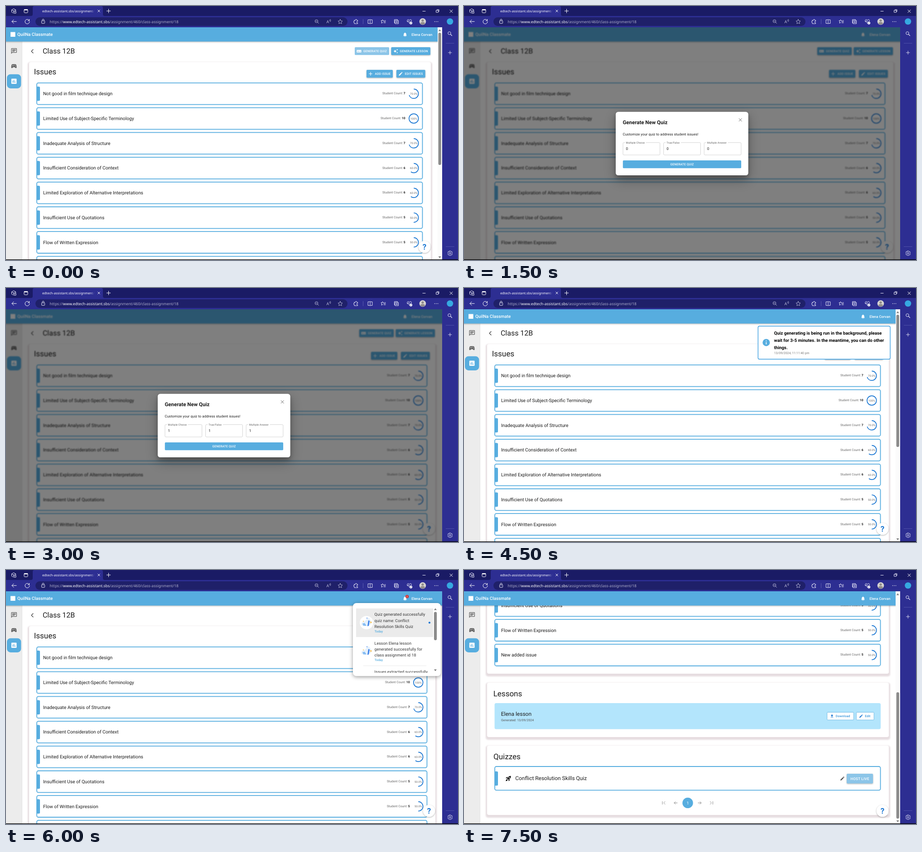
Recreate the animation shown at these times as an HTML page. Size 998x561 px, loop 8000 ms.

```html
<!DOCTYPE html>
<html lang="en">
<head>
<meta charset="utf-8">
<title>Class issues</title>
<style>
  html, body { margin: 0; width: 100%; height: 100%; overflow: hidden; background: #fff; }
  svg { display: block; width: 998px; height: 561px; }
  text { font-family: Roboto, sans-serif; text-rendering: geometricPrecision; white-space: pre; }
  .ui { font-family: "Noto Sans", sans-serif; }
  .line { fill: none; stroke-linecap: round; stroke-linejoin: round; }
  .lift { filter: drop-shadow(0 1px 1.5px rgba(0,0,0,.3)); }
  .blurred { filter: blur(1.3px); }
  .dialog { filter: drop-shadow(0 5px 5px rgba(0,0,0,.25)) drop-shadow(0 9px 14px rgba(0,0,0,.28)); }
  .popover { filter: drop-shadow(0 2px 4px rgba(0,0,0,.4)); }
  .card-shadow { filter: blur(1.5px); }
</style>
</head>
<body>
<svg id="stage" viewBox="0 0 998 561"></svg>
<script>
const BLUE = '#57addf', PALE = '#8cc5e8', LINK = '#1976d2', INK = '#1b1b1b', GREY = '#666';
const NAVY = '#1a1b65', INDIGO = '#2d2e92';
const USER = 'Elena Corvan', BRAND = 'QuilNa Classmate', LESSON = 'Elena lesson';
const QUIZ = 'Conflict Resolution Skills Quiz';
const ISSUES = [
  ['Not good in film technique design', 7],
  ['Limited Use of Subject-Specific Terminology', 10],
  ['Inadequate Analysis of Structure', 7],
  ['Insufficient Consideration of Context', 6],
  ['Limited Exploration of Alternative Interpretations', 6],
  ['Insufficient Use of Quotations', 5],
  ['Flow of Written Expression', 5],
  ['New added issue', 5],
];

// Filled glyphs on a 24-unit grid
const GLYPHS = {
  chat: 'M4 2H20Q22 2 22 4V16Q22 18 20 18H6L2 22V4Q2 2 4 2ZM4 4V17L5 16H20V4ZM6 6H18V8H6ZM6 9H18V11H6ZM6 12H14V14H6Z',
  pad: 'M7.5 5H16.5Q20 5 20.5 8.5L21.6 16Q21.5 19 19 19Q18 19 15 16H9Q6 19 5 19Q2.5 19 2.4 16L3.5 8.5Q4 5 7.5 5ZM8 8V10H6V11H8V13H9V11H11V10H9V8ZM14 8V10H16V8ZM16 11V13H18V11Z',
  chart: 'M5 3H19Q21 3 21 5V19Q21 21 19 21H5Q3 21 3 19V5Q3 3 5 3ZM7 10V17H9V10ZM11 7V17H13V7ZM15 13V17H17V13Z',
  bell: 'M10 20H14Q14 22 12 22T10 20ZM18 16L20 18V19H4V18L6 16V11Q6 6 10.5 4.7V4Q10.5 2.5 12 2.5T13.5 4V4.7Q18 6 18 11Z',
  pencil: 'M3 17.2V21H6.8L17.8 9.9L14.1 6.2ZM20.7 7Q21.3 6.3 20.7 5.6L18.4 3.3Q17.7 2.7 17 3.3L15.1 5.1L18.9 8.9Z',
  sparkle: 'M9 4L11.5 9.5L17 12L11.5 14.5L9 20L6.5 14.5L1 12L6.5 9.5ZM19 1L20.2 3.8L23 5L20.2 6.2L19 9L17.8 6.2L15 5L17.8 3.8ZM19 15L20.2 17.8L23 19L20.2 20.2L19 23L17.8 20.2L15 19L17.8 17.8Z',
  quiz: 'M3 6H21Q23 6 23 8V16Q23 18 21 18H3Q1 18 1 16V8Q1 6 3 6ZM5 10V14H10V10ZM14 10V14H16V10ZM18 10V14H20V10Z',
  download: 'M5 20H19V18H5ZM19 9H15V3H9V9H5L12 16Z',
  rocket: 'M21.3 2.7Q22.5 8 17 13.3Q15 15.3 11.2 17L7 12.8Q8.6 9 10.7 7Q16 1.5 21.3 2.7ZM15 7A2 2 0 1 0 15.1 7ZM9.2 6.3L5.6 12.2L2 10.7L6 6.6ZM17.6 14.8L11.8 18.4L13.3 22L17.4 18ZM6 15Q9 15 9 18Q9 21 2 22Q3 15 6 15Z',
};

const rect = (x, y, w, h, fill, r = 0, more = '') =>
  `<rect x="${x}" y="${y}" width="${w}" height="${h}" rx="${r}" fill="${fill}" ${more}/>`;
const circle = (x, y, r, fill, more = '') => `<circle cx="${x}" cy="${y}" r="${r}" fill="${fill}" ${more}/>`;
const border = (color, width) => `stroke="${color}" stroke-width="${width}"`;
const text = (x, y, str, size, { fill = INK, weight = 400, anchor = 'start', gap = 0, cls = '' } = {}) =>
  `<text x="${x}" y="${y}" font-size="${size}" fill="${fill}" font-weight="${weight}" text-anchor="${anchor}" letter-spacing="${gap}" class="${cls}">${str}</text>`;
const glyph = (name, x, y, size, fill) =>
  `<path transform="translate(${x - size / 2} ${y - size / 2}) scale(${size / 24})" fill="${fill}" fill-rule="evenodd" d="${GLYPHS[name]}"/>`;
// Stroked icon drawn around its own centre
const line = (x, y, d, color = '#e6e6f7', width = 1) =>
  `<path class="line" transform="translate(${x} ${y})" d="${d}" ${border(color, width)}/>`;
const plus = (x, y, r, color, width) => line(x, y, `M${-r} 0H${r}M0 ${-r}V${r}`, color, width);
const cross = (x, y, r, color, width) => line(x, y, `M${-r} ${-r}L${r} ${r}M${r} ${-r}L${-r} ${r}`, color, width);
const triangle = (x, y, dir) => `<path d="M${x - 3} ${y + 2 * dir}h6l-3 ${-4 * dir}z" fill="#7d7d7d"/>`;
const label = (x, y, str, fill = '#fff', size = 6.7, anchor = 'start') =>
  text(x, y, str, size, { fill, weight: 500, gap: size * .028, anchor });

function browser() {
  const ring = (x, y, r) => circle(x, y, r, 'none', border('#e6e6f7', 1));
  return rect(0, 0, 998, 47, INDIGO) + rect(0, 0, 998, 22, NAVY) + rect(963, 47, 35, 514, INDIGO)
    + `<path d="M55 22Q59 22 59 18V4Q59 0 63 0H210Q214 0 214 4V18Q214 22 218 22Z" fill="${INDIGO}"/>`
    + line(17, 11, 'M-4.5 -2.5L0 -5L4.5 -2.5V1M-4.5 -2.5V2.5L-1 4.5M-4.5 -2.5L0 0L4.5 -2.5M0 0V2M1 1.5H5V5H1Z')
    + rect(40, 7.5, 8, 7.5, 'none', 1.5, border('#fff', 1)) + rect(40, 7, 8, 2.5, '#fff', 1)
    + `<g clip-path="url(#tabClip)">${text(80, 13.6, 'edtech-assistant.sbs/assignment/', 7.3, { fill: '#fff', cls: 'ui' })}</g>`
    + rect(186, 4, 10, 14, 'url(#tabFade)')
    + cross(205, 11, 2.3, '#fff') + plus(226.5, 11, 4.2, '#fff')
    + line(923, 11.5, 'M-3 0H3') + line(953, 11, 'M-3 -1.5H1.5V3H-3ZM-1.5 -3H3V1.5') + cross(983, 11.5, 3, '#fff')
    + rect(65, 25, 689, 19, '#1f2069', 9.5)
    + line(18, 34.3, 'M5 0H-5M-1 -4L-5 0L-1 4', '#fff') + line(47, 34.5, 'M4 -3A5 5 0 1 0 5 0M4.5 -5V-2H1.5', '#fff')
    + rect(78.5, 32.5, 7, 6, 'none', 1, border('#e6e6f7', 1)) + line(82, 32, 'M-2 0V-1Q-2 -3 0 -3T2 -1V0M0 3.2V3.6')
    + `<text class="ui" x="96.5" y="37.7" font-size="8.5" fill="#aeaecb">https://<tspan fill="#fff">www.edtech-assistant.sbs</tspan>/assignment/460/class-assignment/18</text>`
    + circle(685.5, 33.5, 3.3, 'none', border('#b9b9d8', .9)) + line(686, 34, 'M2 2L4.5 4.5M-2 -.5H1', '#b9b9d8', .9)
    + text(707.5, 38, 'A', 9, { fill: '#b9b9d8', cls: 'ui' }) + line(714.5, 32, 'M0 -1.5Q1 0 0 1.5M1.7 -2.7Q3.5 0 1.7 2.7', '#b9b9d8', .8)
    + line(738, 34.5, 'M0 -5L1.5 -1.7L5 -1.3L2.4 1.1L3.1 4.6L0 2.9L-3.1 4.6L-2.4 1.1L-5 -1.3L-1.5 -1.7Z', '#b9b9d8', .9)
    + line(772.5, 34.5, 'M-3.5 -3H-1Q-1 -5 .5 -5T2 -3H4V-.5Q1.5 -.5 1.5 1T4 2.5V4.5H-3.5V2Q-5 2 -5 .5T-3.5 -1Z')
    + line(788.5, 34.5, 'M0 -5V5', '#6566b4', .8)
    + line(804, 34.5, 'M-1.3 -4H-4.8V4H-1.3M1.3 -4H4.8V4H1.3M0 -5V5')
    + line(833, 34.5, 'M1.5 -2L-.5 -2L-1.5 -4.5L-2.7 -2H-5L-3.3 0L-4 3.5L-1.3 2M1 0H5M1 2.5H5M3 -2.3H5')
    + line(862, 34.5, 'M-3 3H-4.5V-4.5H2.5V-3M-2.5 -2.5H4.5V4.5H-2.5ZM1 -1V3M-1 1H3')
    + line(890.5, 34, 'M0 4L-4 0Q-6 -3 -3.3 -4Q-1 -4.5 0 -2.3Q1 -4.5 3.3 -4Q6 -3 4 0M-5 0H-2L-1 -1.5L.5 1') + circle(894, 37.5, 3.1, '#fff') + line(894, 37.5, 'M-1.3 0L-.3 1L1.4 -1', INDIGO, .8)
    + circle(920, 34.3, 7.3, '#d5d3d2') + circle(920, 32, 2.6, '#8e8a88') + '<path d="M915 39Q915 35.5 920 35.5T925 39Q920 43 915 39Z" fill="#8e8a88"/>'
    + [-3.5, 0, 3.5].map(d => circle(950 + d, 34.5, .8, '#fff')).join('')
    + circle(980.3, 34.2, 7, '#36a9e1')
    + ring(979, 60, 3.2) + line(980, 61, 'M1.5 1.5L4.5 4.5', '#e6e6f7', 1.3)
    + line(980.3, 82.3, 'M-9 0H9', '#5a5bb0', .8) + plus(980.3, 103, 3.7, '#e6e6f7', .9) + line(980.3, 531.5, 'M-9 0H9', '#5a5bb0', .8)
    + ring(980.5, 546, 1.6) + line(980.5, 546, 'M-1.2 -5H1.2L1.8 -3.3L3.6 -4L5 -1.8L3.8 0L5 1.8L3.6 4L1.8 3.3L1.2 5H-1.2L-1.8 3.3L-3.6 4L-5 1.8L-3.8 0L-5 -1.8L-3.6 -4L-1.8 -3.3Z', '#e6e6f7', .9)
    + rect(0, 559.7, 998, 1.3, '#000');
}

const card = (y, h, dx) => rect(48, y, 893 + dx, h + 6, '#e6dde0', 5, 'class="card-shadow"') + rect(51, y, 887 + dx, h, '#fff', 4);

const outlined = (y, h, dx, tabY, tabH) => rect(68, y, 851.5 + dx, h, '#fff', 3.5, border(BLUE, 1.8))
  + `<path d="M67.5 ${tabY}h5q2.5 0 2.5 2.5v${tabH - 5}q0 2.5 -2.5 2.5h-5z" fill="${BLUE}"/>`;

function issueRow([title, count], i, dx) {
  const mid = 193.8 + i * 54.72, x = 900.3 + dx, length = 2 * Math.PI * 10.4;
  return outlined(mid - 23.9, 47.8, dx, mid - 15.8, 31.6)
    + text(82, mid + 3.4, title, 10.28)
    + `<text x="${881.7 + dx}" y="${mid + 1.6}" font-size="6.85" fill="${GREY}" text-anchor="end">Student Count: <tspan font-weight="700" fill="${INK}">${count}</tspan></text>`
    + circle(x, mid, 10.4, 'none', `${border(LINK, 1.7)} stroke-dasharray="${length * count / 10} ${length}" transform="rotate(-90 ${x} ${mid})"`)
    + text(x, mid + 2.2, count === 10 ? '100%' : `${count * 10}.0%`, 6, { fill: GREY, anchor: 'middle', gap: .12 });
}

function button(x, y, w, str, labelX, icon, fill = BLUE) {
  return rect(x, y, w, 17.3, fill, 1.8, fill === BLUE ? 'class="lift"' : '') + icon + label(labelX, y + 11, str);
}

function content(dx, active) {
  const arrow = 'M-3.5 0H3.5M.5 -3L3.5 0L.5 3', last = 'M-3 -3L0 0L-3 3M3 -3V3';
  const pager = (x, d, flip) => `<g transform="translate(${x} 903.4) scale(${flip} 1)">${line(0, 0, d, '#8f8f8f', 1)}</g>`;
  const small = (x, w) => rect(x, 703.2, w, 17, '#fff', 1.5, border(BLUE, .8));
  return line(58, 100, 'M2 -4L-2 0L2 4', '#333', 1.1) + text(81, 105, 'Class 12B', 15.95)
    + button(770 + dx, 91, 76, 'GENERATE QUIZ', 789 + dx, glyph('quiz', 779.5 + dx, 99.8, 11, '#fff'), active ? PALE : BLUE)
    + button(850.5 + dx, 91, 86.5, 'GENERATE LESSON', 869.5 + dx, glyph('sparkle', 860.5 + dx, 99.8, 11, '#fff'))
    + card(124, 494, dx) + text(61.7, 151.2, 'Issues', 17)
    + button(796 + dx, 141, 58, 'ADD ISSUE', 814.5 + dx, plus(805 + dx, 149.7, 3.5, '#fff', 1.1))
    + button(862 + dx, 141, 63.7, 'EDIT ISSUES', 880.8 + dx, glyph('pencil', 871.5 + dx, 149.7, 10.5, '#fff'))
    + ISSUES.map((issue, i) => issueRow(issue, i, dx)).join('')
    + card(638, 120, dx) + text(64.7, 668.2, 'Lessons', 17)
    + rect(67.5, 683, 852.5, 57.5, '#b3e5fc', 3.5)
    + text(81.7, 710.6, LESSON, 12) + text(82, 722.7, 'Generated: 13/09/2024', 6.95, { fill: '#555' })
    + small(801.7, 58.8) + glyph('download', 812.5, 711.7, 9.5, LINK) + label(820.8, 714, 'Download', '#2f91d8', 6.8)
    + small(866.2, 39) + glyph('pencil', 876.7, 711.7, 9.5, LINK) + label(885.2, 714, 'Edit', '#2f91d8', 6.8)
    + card(777, 153, dx) + text(65, 807.2, 'Quizzes', 17)
    + outlined(823, 52.3, dx, 833.8, 31.5)
    + glyph('rocket', 98, 849.4, 14, '#111') + text(113.3, 853, QUIZ, 11.95)
    + glyph('pencil', 835.5, 849.5, 11.5, '#555')
    + rect(845, 839, 58, 21.5, PALE, 2, 'class="lift"') + label(874, 852.5, 'HOST LIVE', '#fff', 8.15, 'middle')
    + pager(441, last, -1) + pager(467.5, arrow, -1) + pager(520.3, arrow, 1) + pager(546.5, last, 1)
    + circle(494, 903.4, 11.7, BLUE) + text(494, 906.6, '1', 9, { fill: '#fff', anchor: 'middle' });
}

function scrollbar(top, height) {
  return rect(953, 47, 10, 513, '#fbfbfb') + rect(954.6, top, 6.2, height, '#8b8b8b', 3.1)
    + triangle(957.7, 53.5, 1) + triangle(957.7, 555, -1);
}

function page({ dx = 0, scroll = 0, active = false, thumb }) {
  return rect(-5, 40, 968, 530, '#fff')
    + `<g transform="translate(0 ${-scroll})">${content(dx, active)}</g>`
    + rect(-5, 70, 40, 495, '#ececec') + rect(35, 70, .7, 495, '#dcdcdc')
    + glyph('chat', 17.7, 99.5, 15, '#606060') + glyph('pad', 17.5, 132.8, 15, '#606060')
    + rect(2, 150.7, 31.3, 31.2, BLUE, 8) + glyph('chart', 17.6, 166.2, 15.5, '#fff')
    + rect(-5, 40, 973, 38.5, BLUE, 0, 'class="lift"')
    + rect(10, 57.5, 10.5, 10.5, '#fff')
    + text(25, 66.2, BRAND, 9.75, { fill: '#fff', weight: 500 })
    + glyph('bell', 881, 63, 11.5, '#fff')
    + text(941.3, 65.5, USER, 7.85, { fill: '#fff', weight: 500, anchor: 'end' })
    + circle(924 + dx, 532, 13.3, '#fff', 'class="lift"')
    + text(924 + dx, 538.3, '?', 17, { fill: LINK, weight: 700, anchor: 'middle' })
    + (thumb ? scrollbar(...thumb) : '');
}

function dialog(value) {
  const field = (x, name, gapWidth) => rect(x, 301.7, 81.7, 27.3, '#fff', 2, border('#c2c2c2', .7))
    + rect(x + 4.5, 300.5, gapWidth, 2.5, '#fff') + text(x + 6.6, 303.7, name, 5.95, { fill: GREY, gap: .03 })
    + text(x + 6.6, 318.4, value, 8.2);
  return `<g class="blurred">${page({ dx: 10 })}</g>` + rect(0, 47, 963, 513, '#000', 0, 'opacity=".5"')
    + rect(335, 233.8, 292.7, 140.2, '#fff', 5.5, 'class="dialog"')
    + text(350.5, 260.6, 'Generate New Quiz', 11.5, { weight: 700 }) + cross(610.2, 251.5, 3, '#555', .9)
    + text(350.6, 286.2, 'Customize your quiz to address student issues!', 7.8, { gap: .07 })
    + field(351, 'Multiple Choice', 46) + field(440.7, 'True/False', 34) + field(530.2, 'Multiple Answer', 48)
    + rect(350.8, 340.9, 261.3, 17.3, BLUE, 1.8) + label(481.5, 352, 'GENERATE QUIZ', '#fff', 6.7, 'middle');
}

function toast() {
  const lines = ['Quiz generating is being run in the background, please',
    'wait for 3-5 minutes. In the meantime, you can do other', 'things.'];
  return rect(649.3, 84.2, 291.7, 73, '#fff', 3, border('#3d9fe0', 1.4))
    + circle(667.3, 120.4, 8, BLUE) + rect(666.5, 119.5, 1.6, 5, '#fff') + circle(667.3, 116.8, 1, '#fff')
    + lines.map((s, i) => text(684.5, 103.4 + i * 15.6, s, 9.75, { fill: '#000', weight: 700 })).join('')
    + text(684.7, 146, '13/09/2024, 11:11:40 pm', 6.9, { fill: '#777' });
}

function notification(y, lines, unread) {
  return (unread ? rect(773, y - 31.5, 170, 63.3, '#ebebeb') + circle(935, y, 2.1, LINK) : '')
    + circle(796, y, 14.8, '#fff')
    + `<g transform="translate(796 ${y})"><path d="M-11 6Q-13 0 -7 -2T1 -10Q5 -13 8 -7Q13 -2 9 4Q4 8 -2 7Z" fill="#e6f1fc"/>`
    + '<path d="M-9 2L-4 1L0 7L-7 7Z" fill="#86bdf2"/><path d="M4 -5L7 -4L5 7L2 8Z" fill="#3d82e8"/>'
    + '<path d="M8 -3L12 -1L9 2Z" fill="#f5b942"/><circle cx="1" cy="-10" r="1" fill="#3d82e8"/><circle cx="-7" cy="-3" r="1" fill="#f5b942"/></g>'
    + lines.map((s, i) => text(813.6, y - 15 + i * 13.2, s, 8.85, { gap: .06, fill: '#333' })).join('')
    + text(813.8, y + 21.7, 'Today', 6.9, { fill: BLUE, weight: 500 });
}

function notifications() {
  return circle(885.6, 58.6, 3.6, '#d32f2f') + text(885.6, 60.7, '!', 6, { fill: '#fff', weight: 700, anchor: 'middle' })
    + rect(766, 73, 194, 161.2, '#fff', 7.5, 'class="popover"')
    + '<g clip-path="url(#listClip)">'
    + notification(116.3, ['Quiz generated successfully', 'quiz name: Conflict', 'Resolution Skills Quiz'], true)
    + notification(179.6, ['Lesson ' + LESSON, 'generated successfully for', 'class assignment id 18'])
    + line(789, 211.6, 'M0 0H139', '#e2e2e2', .7)
    + notification(243, ['Issues extracted successfully'])
    + '</g>'
    + triangle(948, 86.5, 1) + rect(945, 92.5, 6.2, 62.5, '#8b8b8b', 3.1) + triangle(948, 221.5, -1);
}

const TOP = [59, 292], BOTTOM = [270, 279];
const SCENES = [
  [0, page({ active: true, thumb: TOP })],
  [1500, dialog(0)],
  [3000, dialog(1)],
  [4500, page({ thumb: TOP }) + toast()],
  [6000, page({ dx: 10 }) + notifications()],
  [7500, page({ scroll: 389, thumb: BOTTOM })],
];
const LOOP = 8000;

const stage = document.getElementById('stage');
stage.innerHTML = `<defs>
  <clipPath id="pageClip"><rect y="47" width="963" height="513"/></clipPath>
  <clipPath id="tabClip"><rect x="78" width="117" height="22"/></clipPath>
  <clipPath id="listClip"><rect x="770" y="84.5" width="173" height="142.5"/></clipPath>
  <linearGradient id="tabFade"><stop stop-color="${INDIGO}" stop-opacity="0"/><stop offset="1" stop-color="${INDIGO}"/></linearGradient>
  </defs><g clip-path="url(#pageClip)">${SCENES.map(([, art]) => `<g class="scene">${art}</g>`).join('')}</g>` + browser();

const layers = [...stage.querySelectorAll('.scene')];
const start = performance.now();
function draw() {
  const time = (performance.now() - start) % LOOP;
  const current = SCENES.findLastIndex(([at]) => at <= time);
  layers.forEach((layer, i) => { layer.style.display = i === current ? '' : 'none'; });
  requestAnimationFrame(draw);
}
draw();
</script>
</body>
</html>
```
